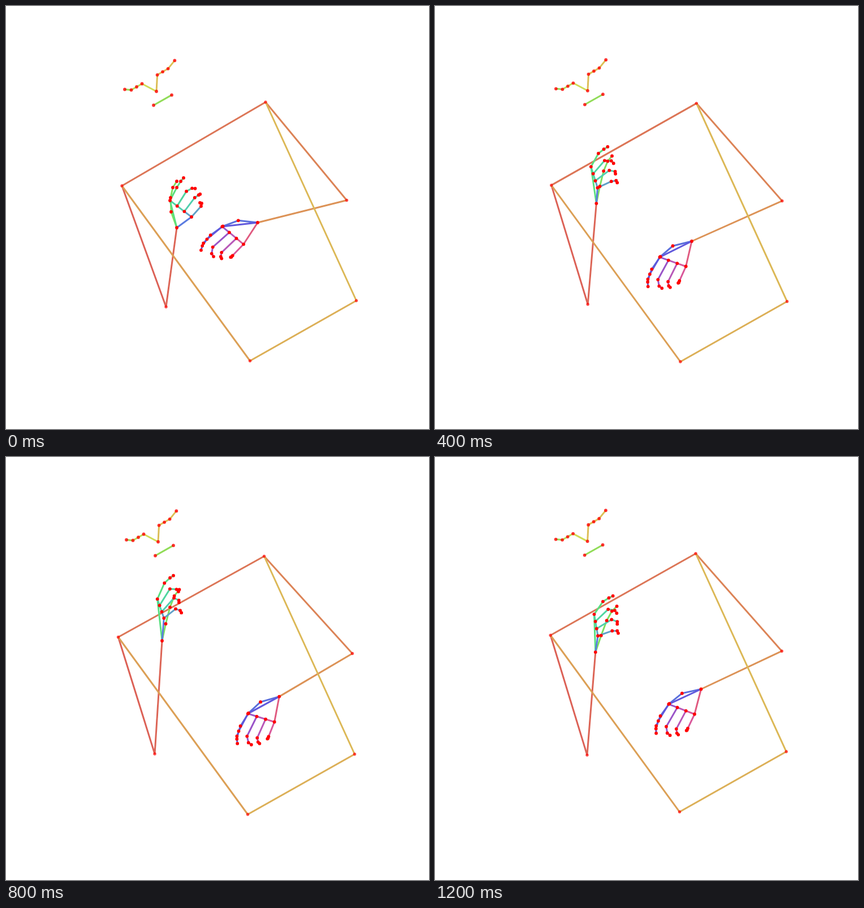
An HTML page with a canvas for the animation above (1.28 s loop, 748 px wide and 748 px high).

```html
<!DOCTYPE html>
<html lang="en">
<head>
<meta charset="utf-8">
<title>Pose skeleton</title>
<style>
html, body { margin: 0; height: 100%; overflow: hidden; background: #fff; }
canvas { display: block; }
</style>
</head>
<body>
<canvas id="stage" width="748" height="748"></canvas>
<script>
const ctx = document.getElementById('stage').getContext('2d');
const STEP = 80, STEPS = 16;

// Motion curves, given at a few steps
const KEYS = [0, 3, 5, 8, 12, 15];
const lift = [0, 0.17, 0.64, 1, 1, 0.7];
const swayX = [0, 3.6, 2.4, -4, -4, 1];
const swayY = [0, 0, 0.5, 3, 3, -1];
const wristRX = [445, 434, 454, 485, 479.5, 470.5];
const wristRY = [383, 387.5, 416, 424, 422.5, 410.5];
const turnL = [0, 10, -2, 0, -2, 4]; // degrees
const turnR = [23, 14.5, 3, 0, 2, 4.5];

// Joint: x, y, share of the sway, travel in x and y at full lift
const joints = {
  nose: [266, 151, 0.4, 4.6, -2.2],
  shoulderL: [205, 318, 1, -2.5, -2.5],
  shoulderR: [459, 170, 1, 1.5, 2.5],
  elbowL: [283, 532, 0, -20, -7],
  elbowR: [602.5, 343.5, 1, 14, 1],
  hipL: [431.5, 627.5, 1, 0, 1.5],
  hipR: [619.5, 521, 1, 1, 1.5],
  wristL: [302, 392, 0, -26, -67]
};

// Hand relative to the wrist: thumb, index and little finger, from base to tip
const openL = [
  [[-10, -28], [-11, -53], [-7, -71], [0, -82]],
  [[-12, -48], [0, -71], [7, -82], [12, -88]],
  [[26, -19], [43, -38], [44, -43], [41, -44]]];
const risingL = [
  [[8, -30], [16, -57], [24, -74], [32, -83]],
  [[-7, -66], [7, -89], [17, -96], [24, -100]],
  [[2, -28], [27, -38], [36, -39], [38, -35]]];
const raisedL = [
  [[7, -30], [15, -59], [23, -79], [32, -90]],
  [[-7, -74], [6, -102], [16, -111], [22, -115]],
  [[4, -40], [25, -56], [33, -53], [35, -49]]];
const handR = [
  [[-33, 10], [-54, 30], [-68, 53], [-74, 71]],
  [[-55, 31], [-71, 62], [-74, 76], [-73, 84]],
  [[-8, 45], [-18, 71], [-19, 74], [-20, 75]]];

const hue = h => `hsl(${h}, 66%, 60%)`;
const coloursL = ['#7fe060', '#5ae080', '#4fd6a0', '#50cfae', '#5fa0c8', '#5a7be0'];
const coloursR = ['#5a6fdc', '#6058dc', '#9a55c8', '#b858b8', '#d9589a', '#e05a80'];

// Linear blend of numbers or of nested lists of numbers
const mix = (a, b, t) =>
  Array.isArray(a) ? a.map((v, i) => mix(v, b[i], t)) : a + (b - a) * t;

// Monotone cubic through the values of a curve
function at(curve, step) {
  const last = KEYS.length - 1;
  const slope = k => (curve[k + 1] - curve[k]) / (KEYS[k + 1] - KEYS[k]);
  const tangent = k => {
    if (k === 0) return slope(0);
    if (k === last) return slope(last - 1);
    const a = slope(k - 1), b = slope(k);
    return a * b > 0 ? 2 * a * b / (a + b) : 0;
  };
  let k = 0;
  while (k < last - 1 && step >= KEYS[k + 1]) k++;
  const h = KEYS[k + 1] - KEYS[k], u = (step - KEYS[k]) / h, v = 1 - u;
  return curve[k] * v * v * (1 + 2 * u) + curve[k + 1] * u * u * (1 + 2 * v) +
    h * u * v * (v * tangent(k) - u * tangent(k + 1));
}

const add = (p, q) => [p[0] + q[0], p[1] + q[1]];

function rotate([x, y], degrees) {
  const a = degrees * Math.PI / 180, c = Math.cos(a), s = Math.sin(a);
  return [x * c - y * s, x * s + y * c];
}

function line(colour, ...points) {
  ctx.strokeStyle = colour;
  ctx.beginPath();
  for (const p of points) ctx.lineTo(...p);
  ctx.stroke();
}

function dots(points, alpha, radius = 2.9) {
  ctx.fillStyle = `rgba(255, 0, 0, ${alpha})`;
  for (const [x, y] of points) {
    ctx.beginPath();
    ctx.arc(x, y, radius, 0, 7);
    ctx.fill();
  }
}

function drawFace(nose) {
  const spot = (x, y) => add(nose, [x, y]);
  const eye = n => spot(-44.5 + 9.5 * n, -2.5 - 5.5 * n); // along the eye line
  const eyeL = [eye(2), eye(1), eye(0)];
  const eyeR = [eye(4.85), eye(5.85), eye(6.85)];
  const earL = spot(-56, -3.5), earR = spot(32.3, -54.6);
  const mouth = [spot(-5, 24.5), spot(27, 6.4)];
  line(hue(66), nose, eyeL[0]);
  line(hue(76), ...eyeL);
  line(hue(92), eyeL[2], earL);
  line(hue(46), nose, eyeR[0]);
  line(hue(48), ...eyeR, earR);
  line(hue(94), ...mouth);
  dots([nose, ...eyeL, ...eyeR, earL, earR, ...mouth], 0.8);
}

// Middle and ring finger lie between index and little finger, longer and more curled
function innerFinger(index, little, t, curl) {
  const base = mix(index, little, t), finger = [base[0]];
  for (let i = 0; i < 3; i++) {
    const size = i ? 1.1 : 1.2;
    const bone = [0, 1].map(a => (base[i + 1][a] - base[i][a]) * size);
    finger.push(add(finger[i], rotate(bone, curl * i)));
  }
  return finger;
}

function drawHand(wrist, [thumb, index, little], curl, turn, colours) {
  const fingers = [thumb, index,
    innerFinger(index, little, 1 / 3, curl),
    innerFinger(index, little, 2 / 3, curl), little]
    .map(f => f.map(p => add(wrist, rotate(p, turn))));
  fingers.forEach((f, i) => {
    line(colours[i], i < 2 ? wrist : fingers[i - 1][0], ...f);
  });
  line(colours[5], wrist, fingers[4][0]);
  dots([wrist, ...fingers.flat()], 1);
}

function draw(step) {
  const up = at(lift, step), sx = at(swayX, step), sy = at(swayY, step);
  const j = { wristR: [at(wristRX, step), at(wristRY, step)] };
  for (const name in joints) {
    const [x, y, share, dx, dy] = joints[name];
    j[name] = [x + share * sx + up * dx, y + share * sy + up * dy];
  }
  const MID = 0.67;
  const handL = up < MID ? mix(openL, risingL, up / MID)
    : mix(risingL, raisedL, (up - MID) / (1 - MID));

  ctx.fillStyle = '#fff';
  ctx.fillRect(0, 0, 748, 748);
  drawFace(j.nose);
  line(hue(14), j.shoulderL, j.shoulderR);
  line(hue(5), j.shoulderL, j.elbowL);
  line(hue(7), j.elbowL, j.wristL);
  line(hue(20), j.shoulderR, j.elbowR);
  line(hue(27), j.elbowR, j.wristR);
  line(hue(33), j.shoulderL, j.hipL);
  line(hue(44), j.shoulderR, j.hipR);
  line(hue(40), j.hipL, j.hipR);
  dots([j.shoulderL, j.shoulderR, j.elbowL, j.elbowR, j.hipL, j.hipR], 0.7, 2.7);
  drawHand(j.wristL, handL, 33, at(turnL, step), coloursL);
  drawHand(j.wristR, handR, -26, at(turnR, step), coloursR);
}

ctx.lineWidth = 3;
ctx.lineJoin = 'round';
const start = performance.now();
function tick() {
  draw(Math.floor((performance.now() - start) / STEP) % STEPS);
  requestAnimationFrame(tick);
}
tick();
</script>
</body>
</html>
```
